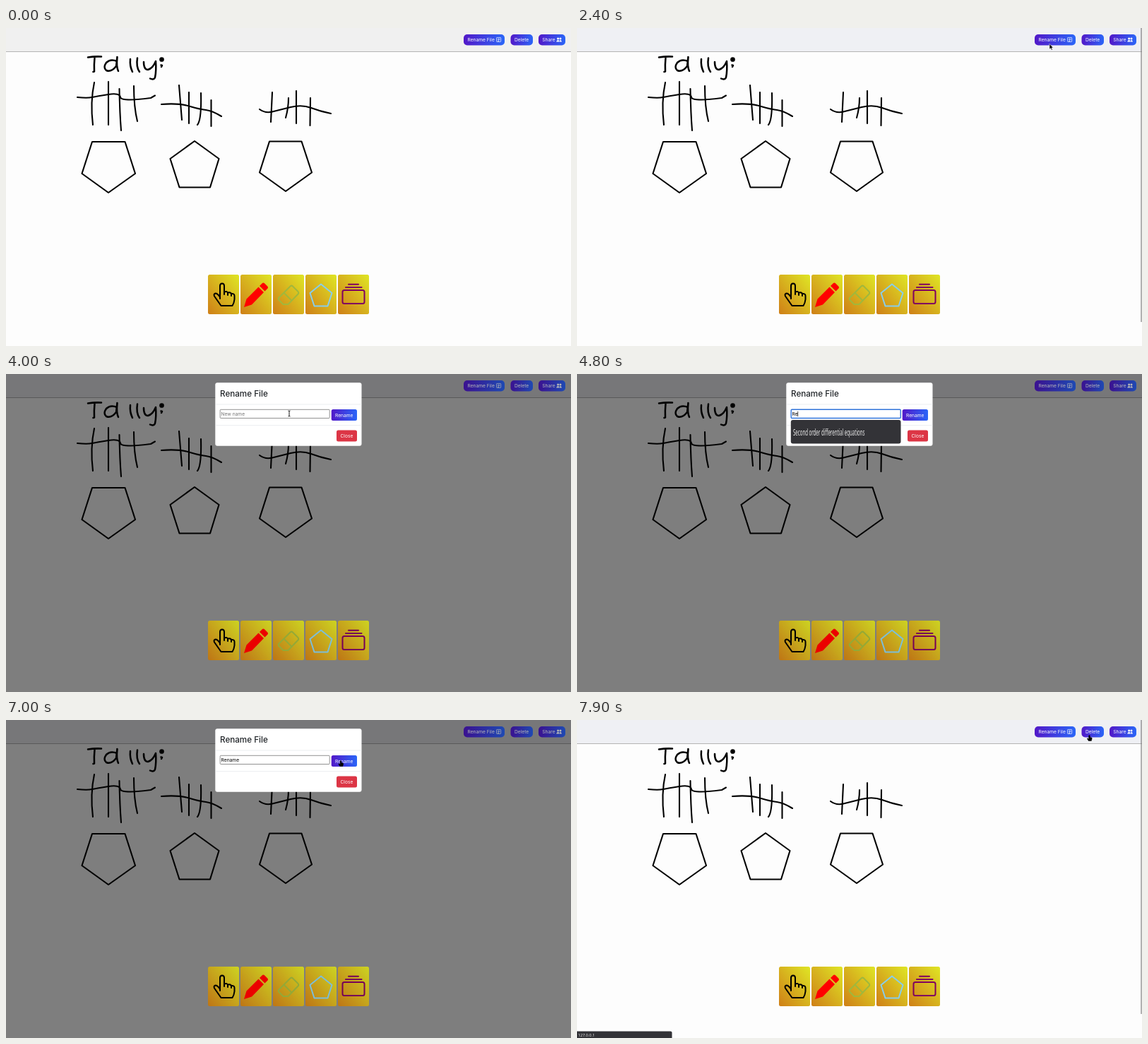
An HTML page that plays this animation: 800x450 px, repeating every 8000 ms.

```html
<!DOCTYPE html>
<html lang="en">
<head>
<meta charset="utf-8">
<title>Rename a drawing</title>
<style>
  html, body { margin: 0; width: 100%; height: 100%; overflow: hidden; background: #fdfdfd; }
  svg { display: block; width: 800px; height: 450px; }
  text { font: 400 6.667px Inter, "Open Sans", sans-serif; fill: #fff; }
  .ink { fill: none; stroke: #000; stroke-width: 2.1; stroke-linecap: round; stroke-linejoin: round; }
  .icon { fill: none; stroke-width: 2; stroke-linecap: round; stroke-linejoin: round; }
  .title { font-size: 11.667px; font-weight: 500; fill: #212529; }
  .status, .hint { font-family: "Noto Sans", "Open Sans", sans-serif; }
  .status { font-size: 5.6px; fill: #e4e4e4; }
  .hint { font-size: 13px; fill: #eee; }
  .dim #actions { filter: brightness(.72); }
  .dim #tools { filter: brightness(.92); }
  [hidden] { display: none; }
</style>
</head>
<body>
<svg id="stage" viewBox="0 0 800 450">
  <defs>
    <linearGradient id="violet"><stop stop-color="#5218c8"/><stop offset="1" stop-color="#2a66f8"/></linearGradient>
    <linearGradient id="gold" x1="0" y1="1" x2="1" y2="0"><stop stop-color="#cf7f17"/><stop offset="1" stop-color="#dfe625"/></linearGradient>
  </defs>

  <rect width="800" height="450" fill="#fdfdfd"/>
  <rect id="bar" width="800" height="33" fill="#f0f0f0"/>
  <path d="M0 33.5H800" stroke="#b4b4b4"/>
  <rect id="scroll" x="798.4" width="1.2" height="416" fill="#808080"/>

  <g class="ink">
    <g stroke-width="2.5">
      <path d="M116 41.5Q125 40 135 40.5M125.500 42Q124.500 52 125 61.500L123.500 62"/>
      <path d="M157 47Q148 43 142 49Q137 56 142 60Q149 63 156 54L157.500 41Q156 55 159 61"/>
      <path d="M176 44Q175 54 179 62M186 42.500Q184 55 189 62"/>
      <path d="M195 48Q195 59 201 59Q208 57 212 47Q213 60 211 70Q209 74 204 71.500"/>
      <path d="M219.500 52.500L221 53L220 55"/>
    </g>
    <circle cx="220.500" cy="44.500" r="2.300" fill="#000"/>

    <path d="M101 98Q115 99.500 122 98T145 94T162 98T205 99L211 95.500"/>
    <path d="M125 77Q119 105 123 137M145 76V137M160.500 86Q161 120 163 145M181 82Q181 112 186 132"/>

    <path d="M220 108Q244 106 259 110.500T283 116T305 125"/>
    <path d="M245 81Q247 105 249 130M259 91V135M276 92Q277 130 271 137M290.500 102V139"/>

    <path d="M359 115Q367 121 377 118.500T403 112T432 113T460 121"/>
    <path d="M377 91L375 133M400 99Q400 113 396 127M411 89V135M431 99L430.500 138"/>

    <path d="M122 161H168.500L183 206L145 233L107.500 206Z"/>
    <path d="M267 160L301.500 185L289 225.500H245.500L232.500 185Z"/>
    <path d="M373 160.500H418.500L433 204.500L396 231L359 204.500Z"/>
  </g>

  <rect id="shade" width="800" height="450" fill="#000" opacity=".5"/>

  <g id="actions">
    <rect x="648" y="9" width="58" height="15.500" rx="5" fill="url(#violet)"/>
    <text x="653.500" y="19">Rename File</text>
    <g fill="none" stroke="#fff" stroke-width=".7">
      <rect x="694.500" y="13.500" width="6.200" height="6" rx=".8"/>
      <path d="M696 15.500H699.300M696 17H699.300M696 18.300H698"/>
    </g>
    <rect x="714.500" y="9" width="31.500" height="15.500" rx="5" fill="url(#violet)"/>
    <text x="720" y="19">Delete</text>
    <rect x="754" y="9" width="38" height="15.500" rx="5" fill="url(#violet)"/>
    <text x="759.300" y="19">Share</text>
    <g fill="#fff">
      <circle cx="781.600" cy="15" r="1.500"/><circle cx="785" cy="15" r="1.500"/>
      <path d="M779.200 19.500Q779.500 17 781.600 17T783.200 19.500ZM783.600 19.500Q783.500 17 785 17T787 19.500Z"/>
    </g>
  </g>

  <g id="tools">
    <g id="tiles"></g>
    <path class="icon" stroke="#000" stroke-width="2.400" d="M303 383V365Q303 361.500 306 361.500T309 365V377M309 373.500Q313.500 372 314 375V378M314 374.500Q318.500 373.500 319 376.500V379M319 376Q323.500 375.500 323.500 379V384Q323 389 320.500 393H304.500L295 379.500Q293.500 376 297 375.500Q300 376 303 381"/>
    <path fill="#f00" d="M337 395L340.500 383.500L357.500 366.500L365 374L348 391.500ZM359 365L363 361Q364.500 360 366 361.200L370.500 365.800Q371.500 367.200 370.500 368.600L366.500 372.500Z"/>
    <path class="icon" stroke="#a0b83c" stroke-width="1.700" d="M403 365Q404.500 364 406 365.500L413.500 373Q415 375 413.500 376.500L399.500 391H392.500L386.500 385Q385 383 386.500 381.500ZM393.500 374.800L404.500 385.800"/>
    <path class="icon" stroke="#87ceeb" d="M446 362.500L461.500 375L455.500 393.500H436.500L430.500 375Z"/>
    <g class="icon" stroke="#800060">
      <path d="M485 362.800H499M481 367H503.500"/>
      <rect x="476.500" y="371" width="31" height="19" rx="2.500"/>
    </g>
  </g>

  <g id="modal">
    <rect x="296.300" y="12.300" width="207.200" height="89.500" rx="3" fill="#fff"/>
    <text class="title" x="303" y="31.500">Rename File</text>
    <path d="M296.500 43H503.500M296.500 72.700H503.500" stroke="#dee2e6" stroke-width=".6"/>
    <rect id="field" x="303.200" y="50.300" width="155" height="12.200" rx="1" fill="#fff"/>
    <text id="entry" x="304.600" y="58.800"></text>
    <path id="caret" stroke="#000" stroke-width=".7"/>
    <rect x="460.700" y="50" width="36.300" height="16" rx="2.500" fill="url(#violet)"/>
    <text x="466" y="60.500">Rename</text>
    <rect x="468" y="79.500" width="29" height="16" rx="2.500" fill="#dc3545"/>
    <text x="473.500" y="89.800">Close</text>
    <g id="popup">
      <rect x="302.800" y="65" width="155.700" height="33.500" rx="3" fill="#333337"/>
      <text class="hint" transform="translate(306 86.500) scale(.47 1)">Second order differential equations</text>
    </g>
  </g>

  <g id="status">
    <path d="M0 440.500H132.500Q134.500 440.500 134.500 442.500V450H0Z" fill="#333337"/>
    <text class="status" x="1.500" y="447.500">127.0.0.1</text>
  </g>

  <g id="cursor">
    <path id="arrow" d="M0 0V7.500L1.700 6L2.900 8.700L4.200 8.100L3 5.500H5.300Z" fill="#000" stroke="#fff" stroke-width=".5"/>
    <path id="hand" d="M-.8 -3.500Q0 -4.400 .8 -3.500V-1L3.200 -.4Q3.800 0 3.600 1L2.800 4H-1.200L-3 1.200Q-3.200 .2 -2.200 .4L-.8 1.400Z" fill="#000" stroke="#000" stroke-width=".5"/>
    <path id="beam" d="M-1.500 -4Q0 -4 0 -3V3Q0 4 -1.500 4M1.500 -4Q0 -4 0 -3M0 3Q0 4 1.500 4" fill="none" stroke="#000" stroke-width=".9"/>
  </g>
</svg>
<script>
const LOOP = 8000, STEP = 100;
const $ = id => document.getElementById(id);
const show = (id, on) => $(id).toggleAttribute('hidden', !on);
const within = (t, from, to) => t >= from && t < to;

// Pointer stops: time, x, y
const route = [
  [1800, 575, 190], [2100, 640, 70], [2400, 669, 22.5], [2500, 668, 20.5],
  [3200, 668, 20.5], [3500, 575, 52], [3800, 440, 60], [4000, 401, 56],
  [4400, 394, 56.5], [6200, 394, 56.5], [6500, 430, 60], [6900, 474, 61.5],
  [7100, 474, 61.5], [7400, 630, 45], [7700, 721, 29], [7900, 725.5, 25.5]
];
const shapes = [[0, ''], [1800, 'arrow'], [3800, 'beam'], [4700, ''], [6200, 'beam'],
  [6700, 'hand'], [7100, 'arrow'], [7900, 'hand']];
const typing = [[0, ''], [4700, 'R'], [4800, 'Re'], [4900, 'Ren'], [5600, 'Rena'], [5700, 'Rename']];

const latest = (table, t) => table.filter(row => row[0] <= t).pop()[1];

function pointAt(t) {
  const next = route.findIndex(stop => stop[0] > t);
  if (next < 0) return route[route.length - 1].slice(1);
  if (next === 0) return route[0].slice(1);
  const [a, b] = [route[next - 1], route[next]];
  const k = (t - a[0]) / (b[0] - a[0]);
  return [1, 2].map(i => a[i] + (b[i] - a[i]) * k);
}

$('tiles').innerHTML = [0, 1, 2, 3, 4].map(i =>
  `<rect x="${286 + i * 46}" y="349" width="44" height="56" rx="2.500" fill="url(#gold)"/>`).join('');

function drawField(t) {
  const value = latest(typing, t);
  const focus = within(t, 4400, 6900);
  const entry = $('entry');
  entry.textContent = value || 'New name';
  entry.style.fill = value ? '#000' : '#757575';
  $('field').setAttribute('stroke', focus ? '#2f73d9' : '#767676');
  $('field').setAttribute('stroke-width', focus ? 1.4 : 0.8);
  const x = 304.6 + (value ? entry.getComputedTextLength() : 0);
  $('caret').setAttribute('d', `M${x} 52.8V60.2`);
  show('caret', focus && !within(t, 5100, 5300) && !within(t, 6200, 6700));
}

function draw(t) {
  const open = within(t, 2500, 7100);
  $('stage').classList.toggle('dim', open);
  show('shade', open);
  show('modal', open);
  show('popup', within(t, 4700, 5600));
  show('scroll', t >= 1800 && !open);
  show('status', t >= 7900);
  $('bar').setAttribute('fill', t < 1800 ? '#f0f0f0' : '#eff0f4');
  if (open) drawField(t);

  const shape = latest(shapes, t);
  for (const id of ['arrow', 'hand', 'beam']) show(id, id === shape);
  $('cursor').setAttribute('transform', `translate(${pointAt(t)})`);
}

function tick() {
  const t = performance.now() % LOOP;
  draw(Math.floor(t / STEP) * STEP);
  requestAnimationFrame(tick);
}
tick();
</script>
</body>
</html>
```
